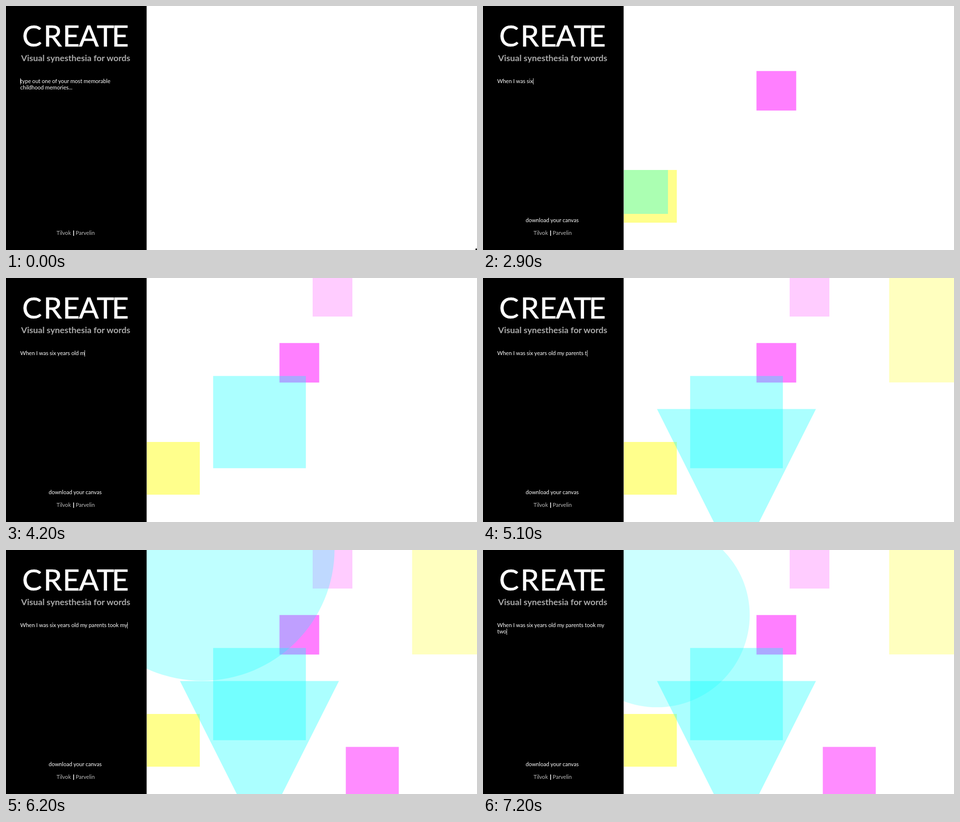
Write an HTML page that moves like this. It is 960x500 px and loops after 7300 ms.

```html
<!DOCTYPE html>
<html lang="en">
<head>
<meta charset="utf-8">
<title>Create</title>
<style>
  html, body { margin: 0; width: 100%; height: 100%; overflow: hidden; background: #fff; }
  svg { display: block; width: 960px; height: 500px; }
  text { font: 11.1px Lato, sans-serif; fill: #fff; white-space: pre; }
  .mid { text-anchor: middle; }
  .title { font-size: 60px; stroke: #fff; stroke-width: .7px; }
  .sub { font-size: 17.7px; font-weight: 700; fill: #aaa; }
  .link { fill: #bbb; }
</style>
</head>
<body>
<svg viewBox="0 0 960 500">
  <g id="art"></g>
  <rect width="286.6" height="500"/>
  <text class="title" x="33 76.5 115.5 148.5 185 215.5" y="82.5">CREATE</text>
  <text class="mid sub" x="142" y="113">Visual synesthesia for words</text>
  <text id="line1" x="29" y="158"></text>
  <text id="line2" x="29" y="171"></text>
  <rect id="caret" width="1" height="13" fill="#ccc"/>
  <text id="save" class="mid" x="141" y="443">download your canvas</text>
  <text class="link" x="103" y="468.5">Tilvok</text>
  <rect x="137" y="460" width="1.5" height="11" fill="#fff"/>
  <text class="link" x="142" y="468.5">Parvelin</text>
  <rect id="corner" x="957" y="497" width="3" height="3"/>
</svg>
<script>
const LOOP = 7300;
const CELL = 67.6;
const UNIT = 27;
const HINT = ['type out one of your most memorable', 'childhood memories...'];
const STORY = ['When I was six years old my parents took my ', 'two'];
// [time in ms, letters typed]
const TYPING = [[1500, 1], [2900, 14], [4200, 26], [5400, 41], [5800, 43], [6200, 43], [7000, 47]];

const YELLOW = '#ff0', PINK = '#f0f', CYAN = '#0ff';
// kind, column, row, size in units, colour, opacity, first and last letter count
const SHAPES = [
  ['square', 0, 5, 4, YELLOW, .45, 4, 99],
  ['square', 4, 2, 3, PINK, .5, 10, 99],
  ['square', 0, 5, 10 / 3, CYAN, .33, 13, 14],
  ['square', 2, 3, 7, CYAN, .33, 15, 99],
  ['square', 5, 0, 3, PINK, .2, 25, 99],
  ['triangle', 1, 4, 12, CYAN, .33, 34, 99],
  ['square', 8, 0, 8, YELLOW, .25, 36, 99],
  ['square', 6, 6, 4, PINK, .45, 41, 99],
  ['circle', 5 / 3, 0, 10, CYAN, .25, 42, 44],
  ['circle', 1, 2, 7, CYAN, .2, 45, 99]
];

const $ = id => document.getElementById(id);
const show = (el, on) => el.setAttribute('visibility', on ? 'visible' : 'hidden');

function outline(kind, x, y, s) {
  if (kind === 'square') return `M${x} ${y}h${s}v${s}h${-s}z`;
  if (kind === 'triangle') return `M${x} ${y}h${s}l${-s / 2} ${s}z`;
  return `M${x - s} ${y}a${s} ${s} 0 1 0 ${2 * s} 0a${s} ${s} 0 1 0 ${-2 * s} 0z`;
}

const art = SHAPES.map(([kind, col, row, size, fill, opacity, from, to]) => {
  const el = document.createElementNS('http://www.w3.org/2000/svg', 'path');
  el.setAttribute('d', outline(kind, 287 + col * CELL, row * CELL - 2, size * UNIT));
  el.setAttribute('fill', fill);
  el.setAttribute('fill-opacity', opacity);
  $('art').append(el);
  return { el, from, to };
});

function typed(t) {
  if (t < TYPING[0][0]) return 0;
  for (let i = 1; i < TYPING.length; i++) {
    const [t0, n0] = TYPING[i - 1], [t1, n1] = TYPING[i];
    if (t < t1) return Math.floor(n0 + (n1 - n0) * (t - t0) / (t1 - t0) + 1e-6);
  }
  return TYPING[TYPING.length - 1][1];
}

function setText(n) {
  const split = STORY[0].length;
  const lines = n ? [STORY[0].slice(0, n), STORY[1].slice(0, Math.max(0, n - split))] : HINT;
  $('line1').textContent = lines[0];
  $('line2').textContent = lines[1];
  const second = n > split;
  const line = $(second ? 'line2' : 'line1');
  const width = n ? line.getComputedTextLength() : 0;
  $('caret').setAttribute('x', 29 + Math.round(width));
  $('caret').setAttribute('y', second ? 161 : 148);
}

let last = -1;
function draw(now) {
  const t = now % LOOP;
  const n = typed(t);
  if (n !== last) {
    last = n;
    setText(n);
    show($('save'), n > 0);
    show($('corner'), n === 0);
    for (const { el, from, to } of art) show(el, n >= from && n <= to);
  }
  show($('caret'), n > 0 || (t + 200) % 1000 < 500);
  requestAnimationFrame(() => draw(performance.now()));
}
draw(0);
</script>
</body>
</html>
```
